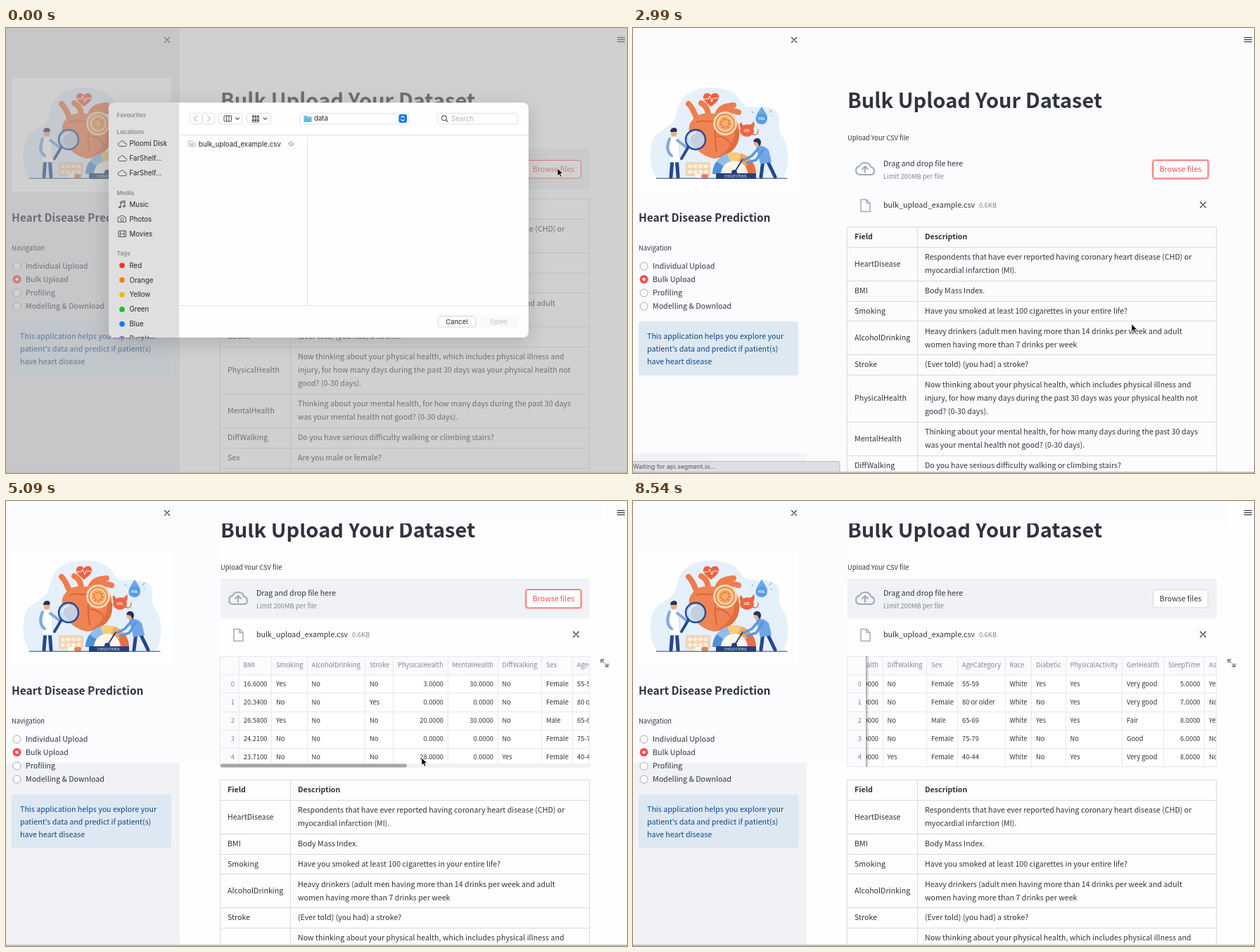
These frames come from a looping animation (883x634 px, 8.56 s). An HTML page with a canvas:

```html
<!DOCTYPE html>
<html lang="en">
<head>
<meta charset="utf-8">
<title>Bulk upload</title>
<style>
html, body { margin: 0; width: 100%; height: 100%; overflow: hidden; background: #fdfdfd; }
canvas { display: block; width: 883px; height: 634px; }
</style>
</head>
<body>
<canvas id="stage" width="883" height="634"></canvas>
<script>
const g = document.getElementById('stage').getContext('2d');
const LOOP = 8560;
const PAGE = '"Noto Sans CJK SC", "Noto Sans CJK JP", "Noto Sans CJK", "Noto Sans", sans-serif';
const UI = 'Inter, Roboto, sans-serif';
const INK = '#31333f', GRAY = '#808495', RED = '#ff4b4b', NAVY = '#24407f';
const BODY = 10.66, SMALL = 9.34;

// ---- helpers ----
const clamp = v => Math.max(0, Math.min(1, v));
const mix = (a, b, p) => a + (b - a) * p;
const ease = p => p * p * (3 - 2 * p);
const part = (t, a, b) => clamp((t - a) / (b - a));

function text(s, x, y, size, color = INK, { w = 400, align = 'left', f = PAGE } = {}) {
  g.font = `${w} ${size}px ${f}`;
  g.textAlign = align;
  g.fillStyle = color;
  g.fillText(s, x, y + size * 0.36);
}
const ui = (s, x, y, size = 9.7, color = '#262626', w = 400, align = 'left') =>
  text(s, x, y, size, color, { w, align, f: UI });

function rect(x, y, w, h, color) { g.fillStyle = color; g.fillRect(x, y, w, h); }
function paint(fill, stroke, lw = 1) {
  if (fill) { g.fillStyle = fill; g.fill(); }
  if (stroke) { g.strokeStyle = stroke; g.lineWidth = lw; g.stroke(); }
}
function box(x, y, w, h, r, fill, stroke, lw) {
  g.beginPath(); g.roundRect(x, y, w, h, r); paint(fill, stroke, lw);
}
function disc(x, y, r, fill, stroke, lw) {
  g.beginPath(); g.arc(x, y, r, 0, Math.PI * 2); paint(fill, stroke, lw);
}
function oval(x, y, rx, ry, fill) {
  g.beginPath(); g.ellipse(x, y, rx, ry, 0, 0, Math.PI * 2); paint(fill);
}
function shape(d, fill, stroke, lw = 1, x = 0, y = 0) {
  g.save();
  g.translate(x, y);
  g.lineCap = g.lineJoin = 'round';
  const p = new Path2D(d);
  if (fill) { g.fillStyle = fill; g.fill(p); }
  if (stroke) { g.strokeStyle = stroke; g.lineWidth = lw; g.stroke(p); }
  g.restore();
}
function clipped(x, y, w, h, draw) {
  g.save(); g.beginPath(); g.rect(x, y, w, h); g.clip(); draw(); g.restore();
}

// ---- sidebar ----
function illustration() {
  shape('M34 214C24 200 22 178 27 162C32 146 50 144 58 132C64 122 62 108 74 97C90 82 120 82 138 90C152 96 152 108 164 112C178 114 194 110 203 118C212 126 204 140 211 152C223 168 224 194 213 214Z', '#e5f0fb');
  // heart with vessels
  shape('M92 132C86 118 84 113 79 108M108 128C106 115 104 111 97 107M119 128C121 115 128 111 143 110M128 122C136 117 142 117 150 120', null, '#ee7c4e', 8);
  shape('M84 132C92 119 106 122 116 122C136 117 151 128 151 146C151 168 135 184 116 186C96 183 80 166 80 148C79 142 80 136 84 132Z', '#f08353');
  shape('M91 134C101 129 109 138 121 129M121 129C116 143 115 157 119 176M120 154C133 155 139 164 140 168', null, '#d9633b', 2);
  shape('M140 134C150 149 143 172 118 185C144 181 153 164 151 146Z', '#e16d40');
  shape('M111 112C102 105 99 101 100 97C102 91 109 92 111 96C114 91 121 92 122 97C123 102 119 106 111 112Z', '#ef623f');
  shape('M101 101H107L109 97L112 105L114 100H121', null, '#fff', 1);
  disc(131, 136, 17, '#fbd9ae');
  disc(131, 136, 14, '#ef8951');
  disc(131, 136, 11, '#f7b069', '#fff0d4', 1.2);
  g.setLineDash([2, 2]); disc(131, 136, 6, null, '#df7340', 3); g.setLineDash([]);
  // drop and blob
  shape('M183 112C188 120 192 124 191 130C190 137 183 139 178 136C171 132 175 123 183 112Z', '#68a7e9');
  disc(183, 129, 7, '#589ae3');
  shape('M171 121L169 119M194 120L197 117M196 125H198', null, '#8db9eb', 1.2);
  text('HDL', 183, 129, 4.8, '#fff', { w: 700, align: 'center' });
  shape('M153 134L157 139Q162 136 167 138L172 133Q174 139 171 143Q174 150 168 153Q162 157 156 153Q150 149 153 143Q150 138 153 134Z', '#ef6542');
  shape('M170 151Q178 155 178 145', null, '#ef6542', 1.4);
  text('LDL', 162, 146, 4.8, '#fff', { w: 700, align: 'center' });
  // tablets
  box(75, 191, 35, 20, 3, '#f5d3b4');
  for (let i = 0; i < 8; i++) oval(81 + i % 4 * 7.5, 197 + (i >> 2) * 8, 2.8, 2.6, '#fff4e7');
  box(88, 208, 18, 6, 3, '#fff');
  box(97, 208, 10, 6, 3, '#ee8051');
  // gauge
  ['#4f8fdb', '#8fbdec', '#f8cb7b', '#f4a65a', '#ec6d43'].forEach((c, i) => {
    g.beginPath();
    g.arc(144, 208, 25, Math.PI * (1 + i / 5), Math.PI * (1 + (i + 1) / 5));
    paint(null, c, 12);
  });
  g.beginPath(); g.arc(144, 208, 18, Math.PI, 0); paint('#fff6e8');
  shape('M144 206L156 187', null, NAVY, 2);
  disc(144, 206, 4, NAVY);
  box(118, 207, 57, 8, 1, NAVY);
  text('CHOLESTEROL', 146, 211, 4.8, '#fff', { align: 'center' });
  // left figure
  shape('M56 185L54 212M62 185L64 212', null, '#26478d', 5);
  shape('M53 156Q59 152 65 157L67 191H51Z', '#fff', '#cdddf2', 1);
  shape('M52 158Q45 174 55 182M63 160L76 170', null, '#7fa8df', 4);
  disc(58, 150, 4.5, '#f0aa83');
  shape('M53 148Q53 142 59 142Q64 143 62 148Z', '#24315f');
  // magnifier
  shape('M79 169L69 186', null, '#2a4b90', 4);
  disc(89, 159, 14, 'rgba(190,221,248,.85)', '#2a4b90', 2.5);
  shape('M80 158Q82 150 89 149', null, '#fff', 1.6);
  // right figure
  shape('M185 188L182 212M190 187L202 212', null, '#26478d', 5);
  shape('M175 169Q184 165 193 174L197 191L181 194Z', '#6ea6e7');
  shape('M178 172L169 182L158 188M185 173L175 188L162 192', null, '#5b96dc', 3.5);
  disc(176, 164, 4.4, '#f0aa83');
  shape('M171 162Q173 155 180 158Q184 163 180 169L177 163Z', '#24315f');
  shape('M33 214.2H219', null, NAVY, 1);
}

function sidebar() {
  rect(8, 71, 227, 162, '#fefefe');
  illustration();
  shape('M225.5 13.5L232.5 20.5M232.5 13.5L225.5 20.5', null, INK, 1.1);
  text('Heart Disease Prediction', 8, 270, 15.5, INK, { w: 700 });
  text('Navigation', 8, 314, SMALL);
  ['Individual Upload', 'Bulk Upload', 'Profiling', 'Modelling & Download'].forEach((s, i) => {
    const y = 339.5 + i * 19;
    if (i === 1) { disc(15.5, y - 0.5, 6, RED); disc(15.5, y - 0.5, 2.3, '#fff'); }
    else disc(15.5, y, 5.5, '#fff', '#a2a5ad', 1);
    text(s, 28, y, BODY);
  });
  box(8, 418, 227, 77, 3, '#dee8f2');
  ['This application helps you explore your', "patient's data and predict if patient(s)", 'have heart disease']
    .forEach((s, i) => text(s, 20, 439 + i * 18, BODY, '#0a4786'));
}

// ---- main column ----
const FIELDS = [
  ['Field', 'Description'],
  ['HeartDisease', 'Respondents that have ever reported having coronary heart disease (CHD) or', 'myocardial infarction (MI).'],
  ['BMI', 'Body Mass Index.'],
  ['Smoking', 'Have you smoked at least 100 cigarettes in your entire life?'],
  ['AlcoholDrinking', 'Heavy drinkers (adult men having more than 14 drinks per week and adult', 'women having more than 7 drinks per week'],
  ['Stroke', '(Ever told) (you had) a stroke?'],
  ['PhysicalHealth', 'Now thinking about your physical health, which includes physical illness and',
    'injury, for how many days during the past 30 days was your physical health not', 'good? (0-30 days).'],
  ['MentalHealth', 'Thinking about your mental health, for how many days during the past 30 days', 'was your mental health not good? (0-30 days).'],
  ['DiffWalking', 'Do you have serious difficulty walking or climbing stairs?'],
  ['Sex', 'Are you male or female?'],
  ['AgeCategory', 'Fourteen-level age category.']
];

function fieldTable(top) {
  const line = '#d9dadd';
  let y = top;
  FIELDS.forEach(([name, ...lines], i) => {
    const h = 9.75 + 19.07 * lines.length, w = i ? 400 : 700;
    rect(305, Math.round(y), 525, 1, line);
    text(name, 315, y + h / 2, BODY, INK, { w });
    lines.forEach((s, k) => text(s, 415, y + 14.4 + k * 19.07, BODY, INK, { w }));
    y += h;
  });
  [304, 404, 829].forEach(x => rect(x, Math.round(top), 1, y - top, line));
}

// name, left edge, values; right-aligned when numeric
const COLUMNS = [
  ['BMI', 331.5, '16.6000,20.3400,26.5800,24.2100,23.7100'],
  ['Smoking', 378, 'Yes,No,Yes,No,No'],
  ['AlcoholDrinking', 428.5, 'No,No,No,No,No'],
  ['Stroke', 511, 'No,Yes,No,No,No'],
  ['PhysicalHealth', 551, '3.0000,0.0000,20.0000,0.0000,28.0000'],
  ['MentalHealth', 628.5, '30.0000,0.0000,30.0000,0.0000,0.0000'],
  ['DiffWalking', 699.5, 'No,No,No,No,Yes'],
  ['Sex', 762, 'Female,Female,Male,Female,Female'],
  ['AgeCategory', 806, '55-59,80 or older,65-69,75-79,40-44'],
  ['Race', 873.5, 'White,White,White,White,White'],
  ['Diabetic', 911, 'Yes,No,Yes,No,No'],
  ['PhysicalActivity', 959.5, 'Yes,Yes,Yes,No,Yes'],
  ['GenHealth', 1040, 'Very good,Very good,Fair,Good,Very good'],
  ['SleepTime', 1099, '5.0000,7.0000,8.0000,6.0000,8.0000'],
  ['Asthma', 1157, 'Yes,No,Yes,No,No']
];

function dataGrid(top, s) {
  const line = '#e7e8eb', row = 26.2, bottom = 158;
  const mid = i => top + 13 + i * row;
  rect(305, top, 525, bottom, '#fff');
  rect(305, top, 525, row, '#fafbfc');
  clipped(331, top, 499, bottom, () => COLUMNS.forEach(([name, left, values], c) => {
    const x = left - s.pan, next = (COLUMNS[c + 1] || [0, 1210])[1] - s.pan;
    const number = /\.\d{4}/.test(values);
    text(name, x + 6, mid(0), SMALL, GRAY);
    values.split(',').forEach((v, i) =>
      text(v, number ? next - 6.5 : x + 6, mid(i + 1), SMALL, INK, { align: number ? 'right' : 'left' }));
    rect(Math.round(next) - 1, top, 1, bottom, line);
  }));
  rect(305, top, 26, bottom, '#fafbfc');
  for (let i = 0; i < 5; i++) text(String(i), 325, mid(i + 1), SMALL, GRAY, { align: 'right' });
  for (let i = 0; i <= 6; i++) rect(305, Math.round(top + i * row), 525, 1, line);
  rect(304, top, 1, bottom, line);
  rect(331, top, 1, bottom, line);
  rect(829, top, 1, bottom, line);
  if (s.pan) {
    const shade = g.createLinearGradient(331, 0, 336, 0);
    shade.addColorStop(0, s.thumb ? 'rgba(0,0,0,.2)' : 'rgba(0,0,0,.3)');
    shade.addColorStop(1, 'rgba(0,0,0,0)');
    rect(331, top, 5, bottom, shade);
  }
  if (s.thumb) {
    rect(305, top + 153, 525, 6, '#f1f1f2');
    box(305 + s.pan * 174 / 344, top + 153.5, 265, 5, 2.5, '#a5a5a7');
  }
  shape('M-5 -1V-5H-1M-5 -5L-1 -1M5 1V5H1M5 5L1 1', null, '#74767f', 1.5, 851, top + 10);
}

function uploader(y, s) {
  text('Upload Your CSV file', 305, y + 157, SMALL);
  box(305, y + 172, 525, 58, 3, s.zone);
  shape('M-8 8Q-13 7 -13 2Q-13 -3 -8 -4Q-6 -9 0 -9Q7 -9 8 -3Q13 -2 13 3Q13 8 8 8ZM0 5V-3M-4 0L0 -4L4 0', null, '#a3a8b8', 2, 330, y + 201);
  text('Drag and drop file here', 356, y + 193, BODY);
  text('Limit 200MB per file', 356, y + 211.5, SMALL, GRAY);
  const on = s.button !== 'idle';
  if (s.button === 'focus') box(737.5, y + 187, 82, 29, 4, '#ffb9b9');
  box(739.5, y + 188.5, 78, 25.5, 3, '#fff', on ? RED : '#d6d7db', 1);
  text('Browse files', 778.5, y + 201.5, BODY, on ? RED : INK, { align: 'center' });
  if (!s.file) return;
  shape('M-6 -8.5H2L7 -3.5V8.5H-6ZM2 -8.5V-3.5H7', null, '#a3a8c4', 1.5, 330, y + 253);
  text('bulk_upload_example.csv', 356, y + 252, BODY);
  text('0.6KB', 492, y + 252.5, SMALL, GRAY);
  shape('M-4 -4L4 4M4 -4L-4 4', null, INK, 1.1, 810.5, y + 252);
}

function page(s) {
  rect(0, 0, 883, 634, s.bg);
  rect(0, 0, 247, 634, s.side);
  if (s.loaded) {
    rect(0, 0, 305, 373, '#fafcfe');
    rect(0, 0, 847, 32, '#fafcfe');
  }
  const top = s.scroll ? 32 : 0;
  clipped(300, top, 583, 632 - top, () => {
    const y = -s.scroll;
    text('Bulk Upload Your Dataset', 305, y + 104, 29.1, INK, { w: 700 });
    uploader(y, s);
    if (s.grid) dataGrid(y + 283, s);
    fieldTable(y + (s.grid ? 459 : s.file ? 283 : 243));
  });
  sidebar();
  [13, 16, 19].forEach(h => rect(869, h, 11, 1.2, INK));
  if (s.status) {
    rect(0, 606, 247, 12, '#f1f3f6');
    box(-4, 617.5, 298, 20, 3, '#dddfe3', '#b9bcc1', 1);
    text('Waiting for api.segment.io...', 0, 625, 8.9, '#55575b', { f: UI });
  }
}

// ---- file dialog ----
const CLOUD = 'M-4 3.5Q-6.5 3 -6 0Q-5.5 -2 -3.5 -2Q-2 -5 1 -4Q3 -3.5 3 -1Q6 -1 6 1.5Q6 3.5 4 3.5Z';
const DOWN = 'M-2.5 -1.2L0 1.3L2.5 -1.2';

function dialogSide(s) {
  const icon = s.late ? '#111' : '#5d5d5f';
  const head = (t, y) => ui(t, 157.5, y, 8.2, '#89898b', 600);
  rect(146, 105, 100, 337, s.late ? '#e4e5e6' : '#dfdfe0');
  head('Favourites', 124);
  head('Locations', 148);
  ['Ploomi Disk', 'FarShelf...', 'FarShelf...'].forEach((t, i) => {
    const y = 165 + i * 21;
    shape(CLOUD, null, icon, 1, 165.5, y);
    ui(t, 175.5, y);
  });
  head('Media', 235);
  shape('M-2 4V-4L4 -5.5V2.5M-2 -2L4 -3.5', null, icon, 1.2, 165, 251.5);
  oval(161.8, 255.3, 1.8, 1.4, icon);
  oval(167.8, 254, 1.8, 1.4, icon);
  ui('Music', 175.5, 251.5);
  shape('M-5.5 -2.5H-3L-2 -4.5H2L3 -2.5H5.5V4.5H-5.5Z', null, icon, 1, 165, 272);
  disc(165, 273, 2.2, null, icon, 1);
  ui('Photos', 175.5, 272.5);
  box(160, 289, 10.5, 8.5, 1, null, icon, 1.1);
  shape('M162.5 289V297.5M168 289V297.5M162.5 293.2H168', null, icon, 1);
  ui('Movies', 175.5, 293.5);
  head('Tags', 321.5);
  [['Red', '#fb2f2c'], ['Orange', '#ec8200'], ['Yellow', '#efb700'], ['Green', '#1fbf27'], ['Blue', '#0a7bff'], ['Purple', '#9a4fc0']]
    .forEach(([t, c], i) => {
      const y = 338.2 + i * 20.9;
      disc(165, y, 3.8, s.late ? '#000' : c);
      ui(t, 175.5, y);
    });
}

function preview() {
  const edge = 'M517 182.5H617L657 223V291Q657 294 654 294H517Q514 294 514 291V185Q514 182.5 517 182.5Z';
  g.save();
  g.shadowColor = 'rgba(0,0,0,.35)'; g.shadowBlur = 4; g.shadowOffsetY = 1;
  shape(edge, '#f5f5f5');
  g.restore();
  g.save();
  g.clip(new Path2D(edge));
  shape('M522 188L617 188L657 223V289H636L545 207Z', '#e0e0e0');
  for (let r = 0; r < 5; r++)
    for (let i = 0; i < 32; i++) {
      const n = Math.sin(i * 12.9 + r * 78.2) * 43758.5;
      const v = n - Math.floor(n);
      if (v > r * 0.12) rect(522 + i * 3, 188 + r * 4, 1 + v * 1.8, r < 2 ? 2 : 1.4, '#a9a9a9');
    }
  g.restore();
  shape('M617 182.5Q619 200 616 217Q616 224 625 223Q642 220 657 223Z', '#fff', '#c6c6c6', 0.8);
  shape(edge, null, '#d2d2d2', 0.7);
  ui('CSV', 585.5, 273, 15, '#6f6f6f', 700, 'center');
  ui('bulk_upload_example.csv', 436.5, 341.7, 11, '#2b2b2b', 600);
  ui('Comma Separated Spreadsheet (.csv) - 555 bytes', 436.5, 357, 9, '#7e7e7e');
  ui('Information', 436.5, 374.7, 9, '#2b2b2b', 600);
  ui('Created', 436.5, 391.7, 8.2, '#858585', 500);
  ui('Today, 00:31', 734.5, 391.7, 8.2, '#2b2b2b', 600, 'right');
}

function dialog(s) {
  const edge = '#e1e1e1', dark = '#4c4c4c';
  const frame = () => { g.beginPath(); g.roundRect(146, 106.5, 597, 334.5, 8); };
  g.save();
  if (s.late) g.translate(0, -1);
  g.save();
  g.shadowColor = 'rgba(0,0,0,.16)'; g.shadowBlur = 28; g.shadowOffsetY = 7;
  frame(); paint('#fff');
  g.restore();
  frame(); g.clip();
  dialogSide(s);
  rect(246, 105, 497, 337, '#fefefe');
  rect(246, 152, 497, 1, '#e2e2e2');
  rect(246, 395, 497, 1, '#e2e2e2');
  rect(428, 153, 1, 242, '#e2e2e2');

  box(261.5, 121.5, 17, 15.5, 3, '#fff', edge);
  box(279.5, 121.5, 17, 15.5, 3, '#fff', edge);
  shape('M271.5 125L267.5 129L271.5 133M286.5 125L290.5 129L286.5 133', null, '#c4c4c4', 1.1);
  box(302.5, 121.5, 34, 15.5, 3, '#fff', edge);
  box(310, 125, 10.5, 8, 1, null, dark, 1);
  shape('M313.5 125V133M317 125V133', null, dark, 1);
  shape(DOWN, null, dark, 1.2, 329, 129);
  box(342.5, 121.5, 34, 15.5, 3, '#fff', edge);
  for (let i = 0; i < 6; i++) rect(350 + i % 3 * 3.6, 124.5 + (i > 2 ? 5.5 : 0), 2.6, 3, dark);
  shape('M350 128.8H360M350 134.3H360', null, dark, 0.8);
  shape(DOWN, null, dark, 1.2, 368.5, 129);
  box(417.5, 121.5, 154.5, 15.5, 3, '#fff', edge);
  shape('M423.5 125H427.5L429 126.2H434.5V134H423.5Z', '#53bce9');
  rect(423.5, 127.5, 11, 0.8, '#8ed8f5');
  ui('data', 438, 129);
  box(558.5, 123, 11.5, 12, 2.5, '#0f76ee');
  shape('M562 127.5L564.2 125.5L566.4 127.5M562 130.5L564.2 132.5L566.4 130.5', null, '#fff', 1.1);
  box(613.5, 121.5, 114, 15.5, 3, '#fff', edge);
  disc(623, 128.3, 3.4, null, '#555', 1.1);
  shape('M625.6 131L628.3 133.8', null, '#555', 1.2);
  ui('Search', 633, 129.2, 9.7, '#b3b3b3');

  if (s.picked) box(254, 157.5, 167, 16.5, 3.5, '#0b5fd9');
  const tone = s.picked ? '#fff' : '#262626', ring = s.picked ? '#3d86ef' : '#777';
  shape('M0 0H6L9 2.5V8H0Z', s.picked ? '#fff' : '#f3f3f3', s.picked ? null : '#b6b6b6', 0.8, 260, 161);
  shape('M262 165H267M262 167H266', null, '#888', 0.7);
  ui('bulk_upload_example.csv', 274, 165.5, 9.7, tone);
  [0.1, 3.24].forEach(a => { g.beginPath(); g.arc(405.3, 165, 2.7, a, a + 2.5); paint(null, ring, 0.9); });
  shape('M401.6 165.6L402.6 164.3L403.9 165.6M406.7 164.4L408 165.7L409 164.4', null, ring, 0.8);
  if (s.picked) clipped(429, 154, 313, 241, preview);

  box(614.5, 410.5, 53.5, 15.5, 3.5, '#fff', '#d4d4d4');
  ui('Cancel', 641, 418.2, 9.6, '#262626', 400, 'center');
  box(674, 410.5, 54, 16, 3.5, s.picked ? '#1a82fb' : '#f9f9f9');
  ui('Open', 700.5, 418.2, 9.6, s.picked ? '#fff' : '#bcbcbc', 400, 'center');
  g.restore();
}

// ---- pointer ----
function pointer(s) {
  if (!s.at) return;
  const [x, y] = s.at;
  if (s.hand)
    shape('M3 8V1.5Q3 0 4.2 0Q5.4 0 5.4 1.5V5Q7.5 4.3 8 5.8Q10.8 5.4 10.6 8Q10.7 11 9 13.5H4.5Q2 10 0.5 8.3Q1 6.2 3 8ZM5.4 5V7.5M7.9 6V8', '#fff', '#111', 1, x, y);
  else
    shape('M0 0V10.4L2.5 8.2L4.2 12.2L6 11.4L4.4 7.5H7.6Z', '#000', '#fff', 0.7, x, y);
}

function pointerAt(t) {
  if (t < 1350) {
    const p = ease(part(t, 150, 1200)), q = 1 - p;
    return [q * q * 784 + 2 * p * q * 560 + p * p * 403, q * q * 200 + 2 * p * q * 95 + p * p * 162];
  }
  const legs = [
    [1350, 2390, 403, 162, 705, 421.5],
    [2840, 2841, 705, 421.5, 709, 422],
    [2990, 3590, 709, 422, 591, 366],
    [5090, 5540, 591, 366, 556, 375],
    [5840, 6740, 556, 375, 731, 390],
    [6890, 7190, 731, 390, 847, 590]
  ];
  const [a, b, x0, y0, x1, y1] = legs.filter(l => t >= l[0]).pop();
  const p = ease(part(t, a, b));
  return [mix(x0, x1, p), mix(y0, y1, p)];
}

const tick = t => t < 2390 ? Math.min(Math.floor(t / 150) * 150, 2250) : 2390 + Math.floor((t - 2390) / 150) * 150;

function state(time) {
  const t = tick(time);
  const late = t >= 2540, loaded = t >= 3290, modal = t < 2840;
  const pale = late && !loaded;
  return {
    late, loaded, modal,
    picked: t >= 1350,
    file: t >= 2990,
    grid: t >= 3440,
    status: t === 2990 || t === 3140,
    bg: pale ? '#fcfcfd' : '#fefefe',
    side: pale ? (modal ? '#f5f8f8' : '#fafcfd') : modal ? '#eaecef' : '#f0f2f6',
    zone: pale ? (modal ? '#f5f6f8' : '#fbfcfd') : '#f0f2f6',
    button: t >= 5990 ? 'idle' : late ? 'focus' : 'hover',
    scroll: Math.round(89 * ease(part(t, 3890, 4340)) - 27 * ease(part(t, 4490, 5090))),
    pan: 344 * ease(part(t, 5840, 6740)),
    thumb: t < 7340,
    hand: (t >= 2390 && modal) || t === 5540,
    at: t < 7340 ? pointerAt(t) : null
  };
}

function draw(time) {
  const s = state(time % LOOP);
  page(s);
  if (s.modal) {
    rect(0, 0, 883, 634, 'rgba(167,167,167,.52)');
    dialog(s);
  }
  rect(0, 632, 883, 2, '#c3c3c5');
  pointer(s);
}

const start = performance.now();
function loop() {
  draw(performance.now() - start);
  requestAnimationFrame(loop);
}
loop();
</script>
</body>
</html>
```
